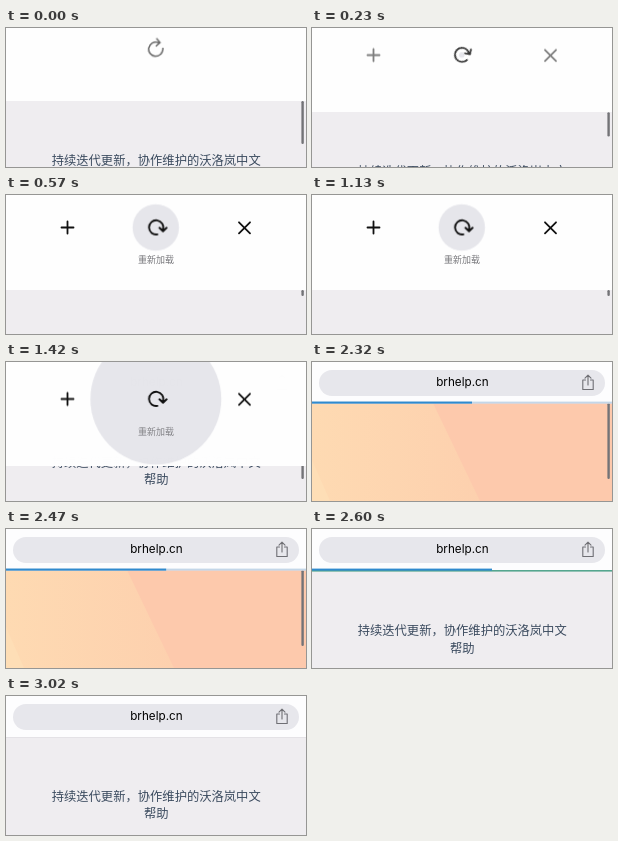
An HTML page for the animation above (4.28 s loop, 300 by 139 pixels).

```html
<!DOCTYPE html>
<html lang="zh-CN">
<head>
<meta charset="utf-8">
<title>下拉刷新</title>
<style>
  html, body { margin: 0; width: 100%; height: 100%; overflow: hidden; background: #efedf0; }
  svg { display: block; position: absolute; left: 0; top: 0; width: 300px; height: 139px; }
  .a { animation: 4280ms linear infinite; }

  .copy { font: 12.3px "Noto Sans CJK SC", "Noto Sans CJK", sans-serif; fill: #3a4a5e; text-anchor: middle; animation-name: copy; }
  .scroll { fill: #737377; animation-name: scroll; }
  .splash { animation-name: splash; }
  .url { font: 11.7px Inter, "Liberation Sans", sans-serif; fill: #000; text-anchor: middle; }
  .line { fill: none; stroke-linecap: round; stroke-linejoin: round; }
  .load { animation-name: load; }
  .track { fill: #c3d6e8; animation-name: track; }
  .bar { fill: #2f8ace; animation-name: bar; }
  .green { fill: #55a68f; animation-name: green; }

  .pull { position: absolute; left: 0; top: 0; width: 100%; overflow: hidden; background: #fefefe; animation-name: pull; }
  .tools { animation-name: tools; }
  .disc { fill: #e6e6eb; animation-name: disc; }
  .side { stroke: #111; stroke-width: 1.8; animation-name: side; }
  .reload { animation-name: reload; }
  .label { font: 9px "Noto Sans CJK SC", "Noto Sans CJK", sans-serif; fill: #77777b; text-anchor: middle; animation-name: label; }

  @keyframes pull {
    0%, 1.168% { height: 73px; opacity: 1; animation-timing-function: ease-out; }
    13.318%, 29.673% { height: 95px; }
    33.178% { height: 104px; opacity: 1; animation-timing-function: ease-in-out; }
    40.888%, 100% { height: 41px; opacity: 0; }
  }
  @keyframes tools {
    0%, 1.168% { transform: translateY(-11px); animation-timing-function: ease-out; }
    13.318%, 29.673% { transform: none; }
    33.178%, 100% { transform: translateY(4.5px); }
  }
  @keyframes disc {
    0%, 5% { transform: scale(0); animation-timing-function: ease-out; }
    10.5%, 29.673% { transform: scale(1); }
    33.178% { transform: scale(2.8); }
    38%, 100% { transform: scale(7.5); }
  }
  @keyframes side {
    0%, 1.168% { opacity: 0; }
    9%, 100% { opacity: 1; }
  }
  @keyframes reload {
    0%, 1.168% { transform: rotate(-86deg); stroke: #6a6a6a; stroke-width: 1.5; animation-timing-function: ease-out; }
    11%, 100% { transform: none; stroke: #111; stroke-width: 1.9; }
  }
  @keyframes label {
    0%, 6% { opacity: 0; }
    12%, 29.673% { opacity: 1; }
    33.178% { opacity: .9; }
    36.5%, 100% { opacity: 0; }
  }
  @keyframes copy {
    0%, 1.168% { transform: translateY(32px); animation-timing-function: ease-out; }
    13.318%, 32% { transform: translateY(54px); }
    32.01%, 59.34% { transform: none; }
    59.35%, 60.748% { transform: translateY(1.3px); animation-timing-function: ease-out; }
    66.121%, 100% { transform: none; }
  }
  @keyframes scroll {
    0%, 1.168% { y: 73px; height: 43px; animation-timing-function: ease-out; }
    13.318%, 32% { y: 95px; height: 6px; }
    32.01%, 59.34% { y: 41px; height: 76px; opacity: 1; }
    59.35%, 100% { y: 41px; height: 76px; opacity: 0; }
  }
  @keyframes splash {
    0%, 54.2% { opacity: 0; }
    54.21%, 59.34% { opacity: 1; }
    59.35%, 100% { opacity: 0; }
  }
  @keyframes load {
    0%, 38.5% { opacity: 0; }
    40.888%, 67.29% { opacity: 1; }
    70.4%, 100% { opacity: 0; }
  }
  @keyframes track {
    0%, 59.34% { opacity: 1; }
    59.35%, 100% { opacity: 0; }
  }
  @keyframes bar {
    0%, 39.7% { width: 0; }
    40.888%, 42.056% { width: 28px; }
    44.393% { width: 90px; animation-timing-function: ease-out; }
    48.598%, 57.71% { width: 160px; }
    60.748% { width: 180px; animation-timing-function: ease-in-out; }
    66.121%, 100% { width: 300px; }
  }
  @keyframes green {
    0%, 59.34% { opacity: 0; }
    59.35%, 61.5% { opacity: 1; }
    66.121%, 100% { opacity: 0; }
  }
</style>
</head>
<body>
<svg viewBox="0 0 300 139">
  <defs>
    <linearGradient id="warm">
      <stop offset="0" stop-color="#fedab2"/>
      <stop offset="1" stop-color="#fdd0ae"/>
    </linearGradient>
  </defs>
  <rect width="300" height="139" fill="#efedf0"/>
  <g class="a copy">
    <text x="150.2" y="105.2">持续迭代更新，协作维护的沃洛岚中文</text>
    <text x="150.2" y="122.4">帮助</text>
  </g>
  <g class="a splash">
    <path d="M0 41H170V139H0Z" fill="url(#warm)"/>
    <path d="M0 98L18 139H0Z" fill="#fedeb6"/>
    <path d="M121 41H300V139H168Z" fill="#fdc9ac"/>
  </g>
  <rect class="a scroll" x="295.4" width="2.4" rx="1.2"/>

  <rect width="300" height="41" fill="#fdfdfe"/>
  <rect y="41" width="300" height=".6" fill="#dcdbdf"/>
  <rect x="7" y="8" width="286" height="26" rx="13" fill="#e7e7ec"/>
  <text class="url" x="150.4" y="24.3">brhelp.cn</text>
  <path class="line" d="M273.5 18H270.8V27.5H281.2V18H278.5M276 23V13.3M273 16.2L276 13.2L279 16.2" stroke="#6f6f74" stroke-width="1.1"/>
  <rect class="a green" y="41" width="300" height="1.6"/>
  <g class="a load">
    <rect class="a track" y="39.6" width="300" height="1.8"/>
    <rect class="a bar" y="39.6" height="2"/>
  </g>
</svg>

<div class="a pull">
  <svg viewBox="0 0 300 139">
    <g class="a tools">
      <g transform="translate(149.8 32.5)">
        <circle class="a disc" r="23.2"/>
        <path class="a line reload" d="M1.6 6.9A7.1 7.1 0 1 1 7.1 2M3.6 .3L7.2 3.8L10.8 .3"/>
      </g>
      <path class="a line side" d="M55.5 32.5H67.5M61.5 26.5V38.5"/>
      <path class="a line side" d="M233 27.3L244 38.3M244 27.3L233 38.3"/>
      <text class="a label" x="150" y="68.2">重新加载</text>
    </g>
  </svg>
</div>
</body>
</html>
```
